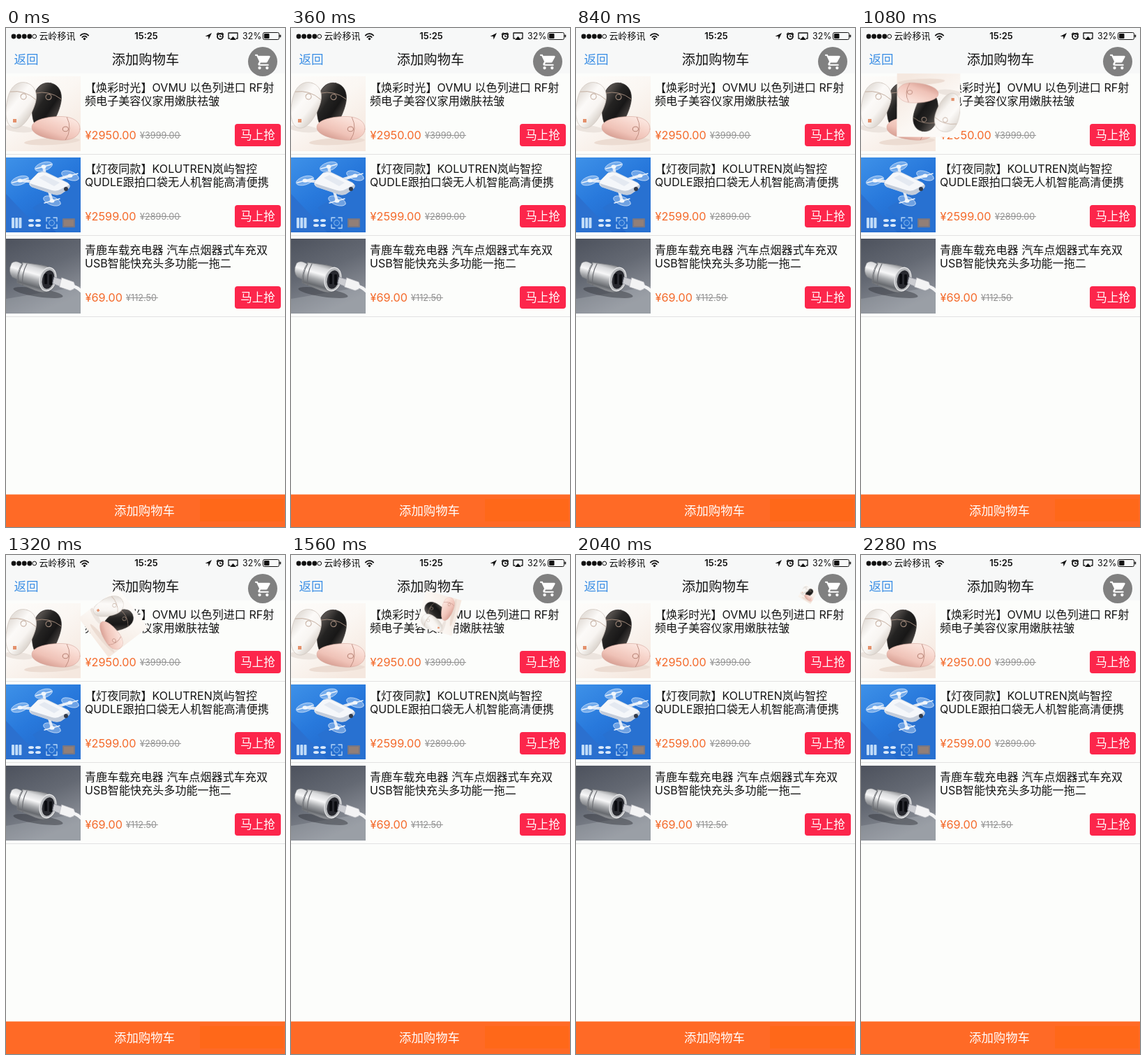
Write an HTML page with a canvas that moves like this. It is 400 by 713 pixels and loops after 2400 ms.

```html
<!DOCTYPE html>
<html lang="zh-CN">
<head>
<meta charset="utf-8">
<title>添加购物车</title>
<style>
html, body { margin: 0; width: 100%; height: 100%; overflow: hidden; background: #fcfdfb; }
canvas { display: block; width: 400px; height: 713px; }
</style>
</head>
<body>
<canvas id="stage" width="400" height="713"></canvas>
<script>
const FONT = 'Inter, "Noto Sans CJK SC", "Noto Sans CJK", "Noto Sans", sans-serif';
const LOOP = 2400, STEP = 120;
const FLY = { start: 894, end: 2176, spin: 0.969 };
const SIZE = 107;

const stage = document.getElementById('stage');
let c = stage.getContext('2d');

function rect(x, y, w, h, color, r = 0) {
  c.fillStyle = color;
  c.beginPath();
  c.roundRect(x, y, w, h, r);
  c.fill();
}

function oval(x, y, rx, ry, turn, fill, stroke, width = 1) {
  c.beginPath();
  c.ellipse(x, y, rx, ry, turn, 0, Math.PI * 2);
  if (fill) { c.fillStyle = fill; c.fill(); }
  if (stroke) { c.strokeStyle = stroke; c.lineWidth = width; c.stroke(); }
}

function shape(d, fill, stroke, width = 1) {
  const p = new Path2D(d);
  if (fill) { c.fillStyle = fill; c.fill(p); }
  if (stroke) { c.strokeStyle = stroke; c.lineWidth = width; c.stroke(p); }
}

function text(s, x, y, size, color, align = 'left', weight = 400) {
  c.font = `${weight} ${size}px ${FONT}`;
  c.textAlign = align;
  c.fillStyle = color;
  c.fillText(s, x, y);
}

function blend(x0, y0, x1, y1, ...colors) {
  const g = c.createLinearGradient(x0, y0, x1, y1);
  colors.forEach((k, i) => g.addColorStop(i / (colors.length - 1), k));
  return g;
}

function layer(w, h, draw) {
  const el = document.createElement('canvas');
  el.width = w;
  el.height = h;
  const old = c;
  c = el.getContext('2d');
  c.lineCap = c.lineJoin = 'round';
  draw();
  c = old;
  return el;
}

// Egg-shaped device, wide end up before turning
function device(x, y, turn, colors, edge, band) {
  c.save();
  c.translate(x, y);
  c.rotate(turn);
  const egg = 'M0 -34C13 -34 20 -23 20 -9C20 8 14 33 0 33C-14 33 -20 8 -20 -9C-20 -23 -13 -34 0 -34Z';
  shape(egg, blend(-20, -8, 20, 8, ...colors), edge, 0.7);
  shape('M-19 -15Q0 -24 19 -15', null, band, 0.9);
  oval(1, -14, 4, 4, 0, colors[1], band, 1.1);
  c.restore();
}

function beautyPhoto() {
  rect(0, 0, SIZE, SIZE, blend(0, 0, 80, 107, '#fdfcfa', '#fbf7f3', '#f5e8df'));
  oval(66, 93, 40, 5, -0.05, '#ecdcd2');
  oval(18, 75, 21, 5, 0.1, '#ece4de');
  device(57, 43, 0.22, ['#55504d', '#242322', '#181717', '#4b4643'], '#3a3634', '#a58d7e');
  device(20, 42, 0.3, ['#e6e1dc', '#fcfaf8', '#f8f5f2', '#d9d2cb'], '#cfc6be', '#c3aea0');
  rect(10, 61, 5, 5, '#e4916c');
  c.save();
  c.translate(71, 74);
  c.scale(1.03, 0.84);
  device(0, 0, 1.62, ['#fbe4dd', '#f6d3c9', '#efc2b7', '#d8a094'], '#d9aca1', '#b98578');
  c.restore();
}

function dronePhoto() {
  rect(0, 0, SIZE, SIZE, blend(0, 0, 70, 107, '#3e91e8', '#2879dc', '#2166c8'));
  shape('M0 52L52 107H0Z', '#2b70cf');
  shape('M107 28V107H72L38 72Z', '#2871d1');
  const hubs = [[20, 33], [54, 13], [92, 26], [66, 62]];
  for (const [x, y] of hubs) {
    shape(`M58 36L${x} ${y}`, null, '#dfe7f2', 4);
    oval(x, y, 13, 6, x > 60 ? 0.35 : -0.3, 'rgba(225,239,255,.38)', 'rgba(235,245,255,.65)', 1);
  }
  shape('M34 34L46 22Q52 19 59 22L88 36Q94 40 89 45L79 52Q72 55 64 51L37 42Q32 39 34 34Z', '#f5f7fa', '#c7d3e4', 0.8);
  shape('M34 37L66 47Q73 49 79 45L91 39Q93 42 89 45L79 52Q72 55 64 51L37 42Z', '#c3ccda');
  shape('M47 29L55 25L77 36L69 41Z', '#e4e9f1');
  for (const [x, y] of hubs) {
    oval(x, y, 3.5, 2.6, 0, '#f7fafc');
    shape(`M${x - 11} ${y + 3}L${x + 11} ${y - 3}`, null, '#edf4fb', 1.4);
  }
  oval(86, 45, 3, 3, 0, '#323b4a');
  // feature icons
  for (let i = 0; i < 3; i++) rect(8 + i * 5.2, 86, 4, 15, '#c1dcf8', 1);
  for (let i = 0; i < 4; i++) oval(36 + i % 2 * 10, 90 + (i >> 1) * 7, 4, 2, 0, '#d8e8fa');
  shape('M58 91V86H63M68 86H73V91M73 96V101H68M63 101H58V96', null, '#b9d8f8', 1.3);
  oval(65.5, 93.5, 4, 4, 0, null, '#8fbdf0', 1);
  rect(81, 87, 18, 13, '#777785', 1);
  rect(83, 89, 14, 9, '#927f77');
}

function chargerPhoto() {
  rect(0, 0, SIZE, SIZE, blend(0, 0, 45, 107, '#4d525d', '#646973', '#8f939b'));
  shape('M0 86L107 68V107H0Z', 'rgba(176,180,187,.35)');
  oval(46, 77, 36, 6, 0.15, 'rgba(45,47,55,.45)');
  const metal = blend(44, 33, 32, 75, '#77797d', '#d9dadc', '#f7f7f8', '#a6a8ab', '#66696e', '#b9bbbe');
  shape('M8 35Q13 31 19 34L27 38L20 60L9 55Q2 47 8 35Z', metal, '#74777c', 0.6);
  shape('M24 34L46 37Q58 38 68 44Q76 56 68 71Q56 80 42 74L16 63Q15 47 24 34Z', metal, '#74777c', 0.8);
  shape('M24 36Q16 49 18 64M30 36Q22 50 24 67', null, '#6d6f74', 1.2);
  oval(60, 58, 11.5, 17, 0.25, '#b4b6b9', '#e6e6e8', 1.3);
  oval(60.5, 58.5, 8.5, 13.5, 0.25, '#292a30');
  rect(55, 50, 4, 15, '#0b0c10', 1);
  rect(62, 51, 4, 15, '#0b0c10', 1);
  shape('M69 55L82 59L79 69L67 64Z', '#cbccd1', '#91949d', 0.8);
  shape('M80 56L97 62Q100 66 97 72L92 74L77 69Z', '#f3f3f4', '#c4c5ca', 0.7);
  shape('M96 68Q102 69 109 76', null, '#f4f4f5', 4.5);
}

const photos = [beautyPhoto, dronePhoto, chargerPhoto].map(draw => layer(SIZE, SIZE, draw));

const items = [
  { lines: ['【焕彩时光】OVMU 以色列进口 RF射', '频电子美容仪家用嫩肤祛皱'], now: '¥2950.00', was: '¥3999.00', x: 192, end: 251 },
  { lines: ['【灯夜同款】KOLUTREN岚屿智控', 'QUDLE跟拍口袋无人机智能高清便携'], now: '¥2599.00', was: '¥2899.00', x: 192, end: 251 },
  { lines: ['青鹿车载充电器 汽车点烟器式车充双', 'USB智能快充头多功能一拖二'], now: '¥69.00', was: '¥112.50', x: 172, end: 218 }
];

function statusBar() {
  const ink = '#111';
  for (let i = 0; i < 4; i++) oval(11 + i * 7.6, 12, 3.4, 3.4, 0, ink);
  oval(40.8, 12, 2.9, 2.9, 0, null, ink, 1);
  text('云岭移讯', 47.5, 16, 13, ink);
  c.strokeStyle = ink;
  c.lineWidth = 1.8;
  for (const r of [4.3, 7.8]) {
    c.beginPath();
    c.arc(112.5, 16, r, -Math.PI * 0.76, -Math.PI * 0.24);
    c.stroke();
  }
  oval(112.5, 15.5, 1.7, 1.7, 0, ink);
  text('15:25', 201, 16, 13, ink, 'center', 600);
  shape('M285.5 12L295 7L290.5 16.5L290 12Z', ink);
  oval(307, 12, 4, 4, 0, null, ink, 1.8);
  shape('M307 10V12.5H309M302.3 9L304.3 7M311.7 9L309.7 7', null, ink, 1.2);
  shape('M321 15H319V7H332V15H330', null, ink, 1.3);
  shape('M325.5 12L330 17H321Z', ink);
  text('32%', 339, 16, 12.4, ink);
  c.strokeStyle = ink;
  c.lineWidth = 1;
  c.beginPath();
  c.roundRect(368.5, 6.5, 23, 10, 2);
  c.stroke();
  rect(370, 8, 7.5, 7, ink, 1);
  rect(392.5, 9.5, 1.7, 4, ink, 0.8);
}

function itemRow(item, i) {
  const y = 65 + i * 116;
  c.drawImage(photos[i], 0, y + 4);
  item.lines.forEach((s, n) => text(s, 113, y + 26 + n * 19.3, 16.1, '#151515'));
  text(item.now, 113.5, y + 94, 16.3, '#f46a2b');
  text(item.was, item.x, y + 93, 12.7, '#929292');
  rect(item.x, y + 88, item.end - item.x, 1, '#929292');
  rect(328, y + 72, 66, 32, '#fc264b', 4);
  text('马上抢', 361, y + 94.3, 16.5, '#fff', 'center');
  rect(0, y + 115, 400, 1, '#e2e2e2');
}

function page() {
  rect(0, 0, 400, 713, '#fcfdfb');
  rect(0, 0, 400, 65, '#f7f8f8');
  statusBar();
  text('返回', 11.5, 51.3, 17.6, '#3c8fe5');
  text('添加购物车', 200, 52.3, 19.3, '#151515', 'center');
  items.forEach(itemRow);
  rect(0, 666.5, 400, 46.5, '#ff6a26');
  rect(278, 673, 120, 32, '#ff6819');
  text('添加购物车', 198.5, 696.3, 17.4, '#fff', 'center');
}

function cartButton() {
  oval(368, 48, 21, 21, 0, '#808080');
  c.save();
  c.translate(356, 35.5);
  c.scale(1.08, 1.08);
  oval(7, 20, 2, 2, 0, '#fff');
  oval(17, 20, 2, 2, 0, '#fff');
  shape('M1 2V4H3L6.6 11.6L5.2 14Q4.3 17 7 17H19V15H7.4L8.3 13H15.6Q16.8 13 17.3 12L21 5.4Q21.2 4 20 4H5.2L4.3 2Z', '#fff');
  c.restore();
}

function flyingPhoto(t) {
  const p = (t - FLY.start) / (FLY.end - FLY.start);
  if (p < 0 || p > 1) return;
  const scale = 1 - 1.08 * p + 0.2 * p * p;
  c.save();
  c.translate(53.5 + 296 * p + 18 * p * p, 121 - 73 * p);
  c.rotate((t - FLY.start) * FLY.spin * Math.PI / 180);
  c.scale(scale, scale);
  c.drawImage(photos[0], -SIZE / 2, -SIZE / 2);
  c.restore();
}

c.lineCap = c.lineJoin = 'round';
c.imageSmoothingQuality = 'high';

const begin = performance.now();
function frame() {
  const t = Math.floor((performance.now() - begin) % LOOP / STEP) * STEP;
  page();
  flyingPhoto(t);
  cartButton();
  requestAnimationFrame(frame);
}
frame();
</script>
</body>
</html>
```
